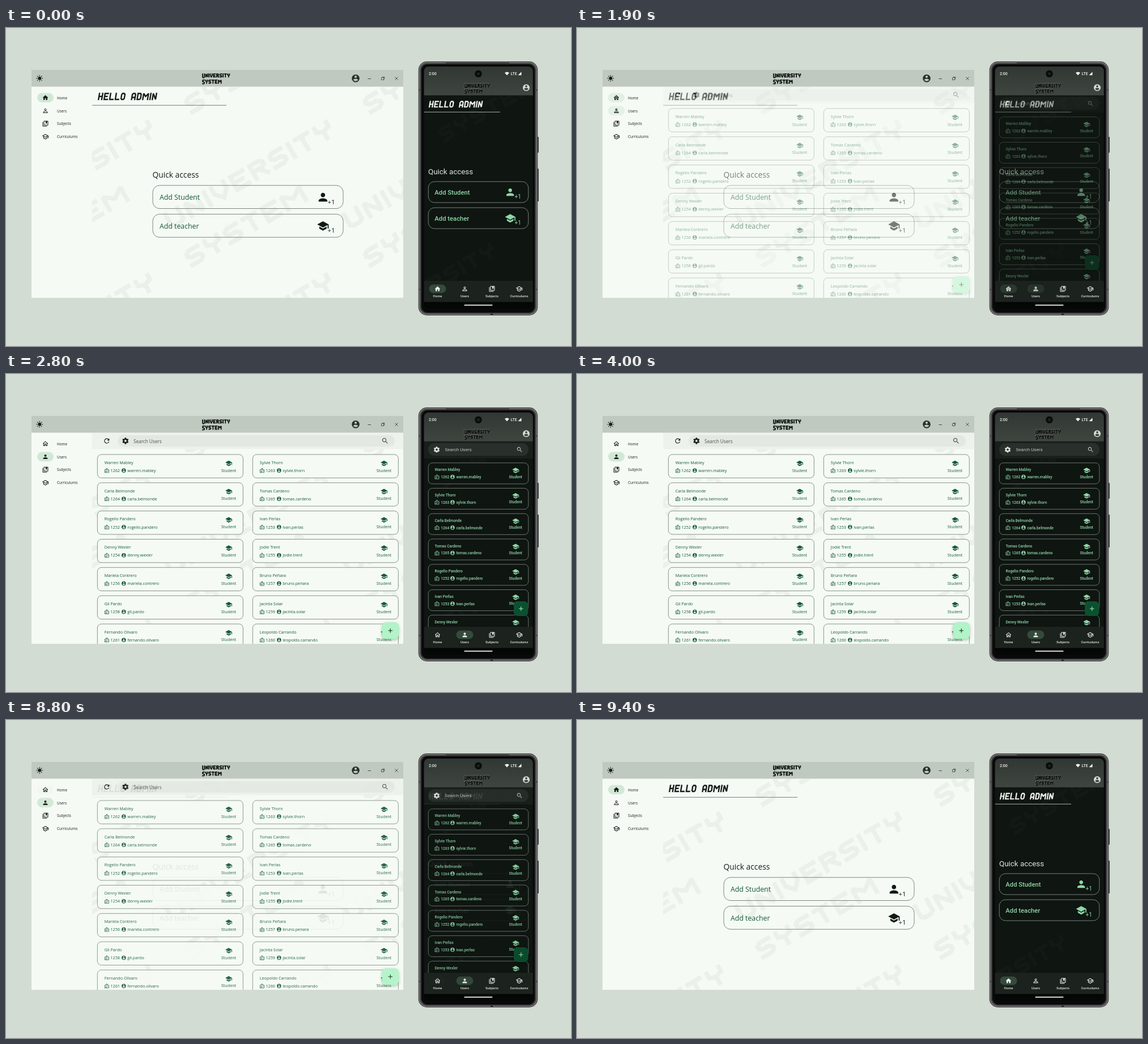
These frames come from a looping animation (997 px wide and 561 px high, 9.5 s). An HTML page with a canvas:

```html
<!DOCTYPE html>
<html lang="en">
<head>
<meta charset="utf-8">
<title>University System</title>
<style>
html, body { margin: 0; width: 100%; height: 100%; overflow: hidden; background: #d2dcd2; }
canvas { display: block; width: 100vw; height: 100vh; }
</style>
</head>
<body>
<canvas id="stage" width="997" height="561"></canvas>
<script>
const W = 997, H = 561, LOOP = 9500;
const SANS = '"Open Sans", "Noto Sans", sans-serif';
const ROBOTO = 'Roboto, Arial, sans-serif';

const PEOPLE = [
  ['Warren Mabley', 1262], ['Sylvie Thorn', 1263],
  ['Carla Belmonde', 1264], ['Tomas Cardeno', 1265],
  ['Rogelio Pandero', 1252], ['Ivan Perlas', 1253],
  ['Denny Wexler', 1254], ['Jodie Trent', 1255],
  ['Mariela Contrero', 1256], ['Bruno Peñara', 1257],
  ['Gil Pardo', 1258], ['Jacinta Solar', 1259],
  ['Fernando Olivaro', 1261], ['Leopoldo Carrando', 1260]
].map(([name, id]) => ({
  name, id,
  login: name.toLowerCase().normalize('NFD').replace(/[\u0300-\u036f]/g, '').replace(' ', '.')
}));

const NAV = ['Home', 'Users', 'Subjects', 'Curriculums'];

// Icons on a 24 unit grid, filled even-odd
const ICONS = {
  home: 'M10 20v-6h4v6h5v-8h3L12 3 2 12h3v8z',
  homeLine: 'M12 5.7l5 4.5V18h-2v-6H9v6H7v-7.8zM12 3L2 12h3v8h6v-6h2v6h6v-8h3z',
  person: 'M12 12c2.2 0 4-1.8 4-4s-1.8-4-4-4-4 1.8-4 4 1.8 4 4 4zm0 2c-2.7 0-8 1.3-8 4v2h16v-2c0-2.7-5.3-4-8-4z',
  personLine: 'M12 5.9a2.1 2.1 0 1 1 0 4.2a2.1 2.1 0 1 1 0-4.2m0 9c3 0 6.1 1.5 6.1 2.1v1.1H5.9V17c0-.6 3.1-2.1 6.1-2.1M12 4a4 4 0 1 0 0 8a4 4 0 1 0 0-8zm0 9c-2.7 0-8 1.3-8 4v3h16v-3c0-2.7-5.3-4-8-4z',
  books: 'M4 6H2v14c0 1.1.9 2 2 2h14v-2H4zM20 2H8c-1.1 0-2 .9-2 2v12c0 1.1.9 2 2 2h12c1.1 0 2-.9 2-2V4c0-1.1-.9-2-2-2zM8 4h12v12H8zM13 4v8l2.5-1.5L18 12V4z',
  cap: 'M5 13.2v4L12 21l7-3.8v-4L12 17zM12 3L1 9l11 6 9-4.9V17h2V9z',
  capLine: 'M12 3L1 9l4 2.2v6L12 21l7-3.8v-6l2-1.1V17h2V9zM18.8 9L12 12.7 5.2 9 12 5.3zM17 16l-5 2.7L7 16v-3.7l5 2.7 5-2.7z',
  account: 'M12 2a10 10 0 1 0 0 20a10 10 0 1 0 0-20zm0 3a3 3 0 1 1 0 6a3 3 0 1 1 0-6zm0 14.2c-2.5 0-4.7-1.3-6-3.2 0-2 4-3.1 6-3.1s6 1.1 6 3.1c-1.3 1.9-3.5 3.2-6 3.2z',
  search: 'M15.5 14h-.8l-.3-.3A6.5 6.5 0 1 0 13.7 14.4l.3.3v.8l5 5 1.5-1.5zM9.5 14a4.5 4.5 0 1 1 0-9a4.5 4.5 0 1 1 0 9z',
  refresh: 'M17.6 6.4A8 8 0 1 0 19.7 14h-2.1A6 6 0 1 1 16.2 7.8L13 11h7V4z',
  badge: 'M20 7h-5V4c0-1.1-.9-2-2-2h-2c-1.1 0-2 .9-2 2v3H4c-1.1 0-2 .9-2 2v11c0 1.1.9 2 2 2h16c1.1 0 2-.9 2-2V9c0-1.1-.9-2-2-2zM4 9h16v11H4zM11 4h2v5h-2zM6 18h6v-1.5L9 15l-3 1.5zM7.5 11h3v3h-3zM14 12h4v1.5h-4zM14 15h4v1.5h-4z',
  plus: 'M19 13h-6v6h-2v-6H5v-2h6V5h2v6h6z'
};
for (const k in ICONS) ICONS[k] = new Path2D(ICONS[k]);

// Display lettering: xy digit pairs, one polyline per word
const GLYPHS = {
  U: '000516364540', N: '06004640', I: '0006', V: '0003264340',
  E: '40000646 0333', R: '06003041423303 2346', S: '40100102133344453606',
  T: '0040 2026', Y: '0002234240 2326', M: '0600336066',
  H: '0006 4046 0343', L: '000646', O: '103041453616050110',
  A: '060110304146 0444', D: '00304145360600'
};

let c;

function box(x, y, w, h, r, fill, stroke, lw = 1) {
  c.beginPath();
  c.roundRect(x, y, w, h, r);
  if (fill) { c.fillStyle = fill; c.fill(); }
  if (stroke) { c.strokeStyle = stroke; c.lineWidth = lw; c.stroke(); }
}

function disc(x, y, r, fill) {
  c.beginPath();
  c.arc(x, y, r, 0, 7);
  c.fillStyle = fill;
  c.fill();
}

function line(x1, y1, x2, y2, color, lw = 1) {
  c.beginPath();
  c.moveTo(x1, y1);
  c.lineTo(x2, y2);
  c.strokeStyle = color;
  c.lineWidth = lw;
  c.stroke();
}

function text(s, x, y, size, color, font = SANS, weight = 400, align = 'left') {
  c.font = `${weight} ${size}px ${font}`;
  c.textAlign = align;
  c.fillStyle = color;
  c.fillText(s, x, y);
}

function icon(name, x, y, size, color) {
  c.save();
  c.translate(x - size / 2, y - size / 2);
  c.scale(size / 24, size / 24);
  c.fillStyle = color;
  c.fill(ICONS[name], 'evenodd');
  c.restore();
}

function rays(x, y, n, r1, r2, color, lw) {
  for (let i = 0; i < n; i++) {
    const a = i * 2 * Math.PI / n, s = Math.sin(a), k = Math.cos(a);
    line(x + s * r1, y + k * r1, x + s * r2, y + k * r2, color, lw);
  }
}

function gear(x, y, r, color) {
  rays(x, y, 6, r * .6, r, color, r * .5);
  c.beginPath();
  c.arc(x, y, r * .56, 0, 7);
  c.strokeStyle = color;
  c.lineWidth = r * .42;
  c.stroke();
}

// x, y is the top left corner of the ink; ux, uy size one glyph unit
function letters(s, x, y, ux, uy, lw, gap, color, { slant = 0, angle = 0, bigFirst = 1 } = {}) {
  c.save();
  c.translate(x, y);
  c.rotate(angle);
  c.transform(1, 0, -slant, 1, 0, 0);
  c.beginPath();
  let pen = lw / 2;
  [...s].forEach((ch, i) => {
    if (ch === ' ') { pen += gap + 5 * ux; return; }
    const ky = uy * (i ? 1 : bigFirst);
    let right = 0;
    for (const part of GLYPHS[ch].split(' ')) {
      for (let j = 0; j < part.length; j += 2) {
        const gx = +part[j], gy = +part[j + 1];
        right = Math.max(right, gx);
        c[j ? 'lineTo' : 'moveTo'](pen + gx * ux, lw / 2 + gy * ky);
      }
    }
    pen += right * ux + lw + gap;
  });
  c.strokeStyle = color;
  c.lineWidth = lw;
  c.lineCap = 'square';
  c.lineJoin = 'miter';
  c.miterLimit = 2;
  c.stroke();
  c.restore();
  c.lineCap = 'butt';
}

function clip(x, y, w, h, draw, r = 0) {
  c.save();
  c.beginPath();
  c.roundRect(x, y, w, h, r);
  c.clip();
  draw();
  c.restore();
}

function wordmark(x, y, k, color) {
  const o = { bigFirst: 1.22 };
  letters('UNIVERSITY', x, y, .78 * k, .9 * k, 1.75 * k, .75 * k, color, o);
  letters('SYSTEM', x, y + 10.8 * k, .78 * k, .9 * k, 1.75 * k, .75 * k, color, o);
}

function hello(x, y, k, color) {
  letters('HELLO ADMIN', x + 2 * k, y, 1.42 * k, 1.75 * k, 2.4 * k, 1.8 * k, color, { slant: .17 });
}

function mark(word, x, y, k, color) {
  letters(word, x, y, 6 * k, 4.2 * k, 8 * k, 7 * k, color, { angle: -Math.PI / 6 });
}

function listCard(p, x, y, w, h, t) {
  const { font, ink, green, size } = t;
  box(x, y, w, h, 7, t.bg, t.edge, .9);
  text(p.name, x + t.pad, y + t.row1, size, green, font, 500);
  icon('badge', x + t.pad + 4, y + t.row2 - 2.7, 9.5, ink);
  text(p.id, x + t.pad + 10.7, y + t.row2, size, green, font, 500);
  icon('account', x + t.user, y + t.row2 - 2.7, 9, ink);
  text(p.login, x + t.user + 6.5, y + t.row2, size, green, font, 500);
  icon('cap', x + w - t.cap, y + t.row1 - 1.2, 13, green);
  text('Student', x + w - t.cap, y + t.row2 - .5, size, green, font, 500, 'center');
}

function fab(x, y, w, h, fill, ink) {
  c.save();
  c.shadowColor = 'rgba(0,0,0,.25)';
  c.shadowBlur = 5;
  c.shadowOffsetY = 2;
  box(x, y, w, h, 7, fill);
  c.restore();
  icon('plus', x + w / 2, y + h / 2, 13, ink);
}

function navIcon(i, active, x, y, color) {
  const name = [active ? 'home' : 'homeLine', active ? 'person' : 'personLine', 'books', 'capLine'][i];
  icon(name, x, y, i === 3 ? 12.5 : 12, color);
}

function desktop(users) {
  const bg = '#f5faf4', ink = '#181d19', green = '#145a36', edge = '#7d8780';
  box(45, 74, 656, 402, 0, bg);

  clip(152, 104, 549, 372, () => {
    for (let i = -1; i < 3; i++) for (let j = -1; j < 3; j++) {
      mark('UNIVERSITY', 276 + i * 315, 328 + j * 270, 1, '#ebf1ea');
      mark('SYSTEM', 311 + i * 315, 395 + j * 270, 1, '#ebf1ea');
    }
    if (users) desktopUsers(bg, ink, green, edge);
    else desktopHome(ink, green, edge);
  });

  NAV.forEach((label, i) => {
    const y = 123 + i * 22.9, on = i === +users;
    if (on) box(55, y - 8.3, 29, 16.6, 8.3, '#d1e8d6');
    navIcon(i, on, 69.5, y, ink);
    text(label, 90, y + 2.6, 6.4, ink, SANS, 500);
  });

  box(45, 74, 656, 29.5, 0, '#bfc9c0');
  disc(59.3, 88.8, 3, ink);
  rays(59.3, 88.8, 8, 4, 5.8, ink, 1.2);
  wordmark(346, 80.2, 1, '#0c0f0d');
  icon('account', 617, 88.8, 16.5, '#2b302c');
  line(638.5, 89.5, 644, 89.5, '#444b46');
  box(662.5, 87.5, 4, 4, 0, null, '#444b46', .9);
  line(664, 86.3, 668, 86.3, '#444b46', .8);
  line(667.7, 86, 667.7, 90.5, '#444b46', .8);
  line(686.3, 86.3, 691.7, 91.7, '#444b46', .9);
  line(691.7, 86.3, 686.3, 91.7, '#444b46', .9);
}

function desktopHome(ink, green, edge) {
  hello(162, 114.3, 1, ink);
  line(152, 136.4, 389, 136.4, '#8c958e', 1.4);
  text('Quick access', 258.5, 263.8, 13.8, ink);
  [['Add Student', 'person', 23], ['Add teacher', 'cap', 22]].forEach(([label, name, size], i) => {
    const y = 277.7 + i * 50.7;
    box(259, y, 336, 40.8, 12, null, edge);
    text(label, 271, y + 25.6, 12.3, green, SANS, 500);
    icon(name, 559.3, y + 20.8, size, '#0e1c14');
    text('+1', 567.5, y + 33, 11.5, '#0e1c14', SANS, 500);
  });
}

function desktopUsers(bg, ink, green, edge) {
  box(152, 104, 549, 28.5, 0, '#edf3ec');
  box(197, 108, 489, 20.3, 10, '#e3e9e2');
  icon('refresh', 177.8, 118, 13.5, ink);
  gear(210.8, 118, 5.6, ink);
  text('Search Users', 225, 121.5, 8.2, '#4a514c');
  icon('search', 669, 118, 13.5, '#3c433e');
  const theme = {
    font: SANS, size: 7.2, green, ink: green, bg, edge,
    pad: 12.5, row1: 16.8, row2: 31, user: 46.5, cap: 25.3
  };
  PEOPLE.forEach((p, i) =>
    listCard(p, i % 2 ? 435.3 : 161.3, 142 + (i >> 1) * 49.83, 257, 41.3, theme));
  fab(663.5, 438, 29.5, 29.5, '#b0f4c7', '#12251a');
}

function phone(users) {
  const bg = '#0f1511', ink = '#e0e5df', green = '#8fd7a8', edge = '#78817a';
  // Body and side keys
  box(936.5, 192, 3.5, 28, 1, '#3d3c3e');
  box(936.5, 248, 3.5, 58, 1, '#3d3c3e');
  box(727.7, 59, 210.6, 448, 15, '#39383a');
  box(729.7, 61, 206.6, 444, 13, null, '#706e71', 2.2);
  box(733, 64, 200, 438, 11, '#080909');
  line(776, 61.5, 888, 61.5, '#2c2b2d', 1.2);
  box(855, 504, 4, 2, 0, '#2a2a2b');
  for (const y of [108, 460]) {
    box(728, y, 4, 2.5, 0, '#444346');
    box(934, y, 4, 2.5, 0, '#444346');
  }

  clip(737.7, 68, 192, 426.5, () => {
    box(737, 68, 194, 416, 0, bg);
    clip(737, 119, 194, 327, () => {
      mark('SYSTEM', 760, 180, .8, '#131915');
      mark('UNIVERSITY', 622, 512, .8, '#131915');
      if (users) phoneUsers(bg, ink, green, edge);
      else phoneHome(ink, green, edge);
    });

    const head = c.createLinearGradient(0, 68, 0, 119);
    head.addColorStop(0, '#313732');
    head.addColorStop(1, '#3f4640');
    box(737, 68, 194, 50.7, 0, head);
    text('2:00', 746, 83, 7, '#f2f4f1', ROBOTO, 500);
    disc(833.5, 80.8, 6.3, '#0a0c0b');
    disc(833.5, 80.8, 2.4, '#1d2722');
    c.beginPath();
    c.moveTo(884, 83.4);
    c.lineTo(880, 79);
    c.quadraticCurveTo(884, 75.8, 888, 79);
    c.moveTo(903.5, 83.3);
    c.lineTo(909.5, 83.3);
    c.lineTo(909.5, 77.3);
    c.fillStyle = '#f2f4f1';
    c.fill();
    text('LTE', 890.5, 83, 6.9, '#f2f4f1', ROBOTO, 500);
    wordmark(808.6, 97.6, .9, '#7d857f');
    wordmark(809.2, 98.2, .9, '#080a09');
    icon('account', 918, 105.3, 14.5, '#d5dad5');

    box(737, 446, 194, 37.5, 0, '#1c221e');
    NAV.forEach((label, i) => {
      const x = 761.5 + i * 48, on = i === +users;
      if (on) box(x - 15, 452.5, 30, 15, 7.5, '#344b3c');
      navIcon(i, on, x, 460.2, '#eef2ed');
      text(label, x, 474.8, 5.9, ink, ROBOTO, 500, 'center');
    });
    box(737, 483.5, 194, 12, 0, '#050606');
    box(808.5, 488, 50, 1.8, .9, '#eceeec');
  }, 8);
}

function phoneHome(ink, green, edge) {
  hello(746, 128.6, .91, '#f0f3ef');
  line(737, 148.4, 872, 148.4, '#89928b', 1.3);
  text('Quick access', 745, 258.4, 13.4, ink, ROBOTO);
  [['Add Student', 'person'], ['Add teacher', 'cap']].forEach(([label, name], i) => {
    const y = 271 + i * 46;
    box(745.2, y, 176.6, 37, 11, null, edge);
    text(label, 756.3, y + 22.6, 11.25, green, ROBOTO, 500);
    icon(name, 889.7, y + 18.7, 20, green);
    text('+1', 897.5, y + 30.3, 10, green, ROBOTO, 400);
  });
}

function phoneUsers(bg, ink, green, edge) {
  box(737, 118, 194, 31, 0, '#191f1b');
  box(745, 122, 177, 22.5, 11.2, '#292f2a');
  gear(760, 133.4, 5.2, ink);
  text('Search Users', 774.6, 136.3, 8, '#c2c9c2', ROBOTO);
  icon('search', 906.3, 133.4, 12, '#c9d0c9');
  const theme = {
    font: ROBOTO, size: 6.7, green, ink: green, bg, edge,
    pad: 11.3, row1: 14.6, row2: 27.4, user: 42.7, cap: 22.6
  };
  PEOPLE.slice(0, 7).forEach((p, i) =>
    listCard(p, 745.2, 156.8 + i * 44.75, 176.6, 37, theme));
  fab(896, 401, 25.5, 26, '#0b5130', '#a9efc0');
}

function scene(users) {
  const layer = document.createElement('canvas');
  layer.width = W;
  layer.height = H;
  c = layer.getContext('2d');
  box(0, 0, W, H, 0, '#d2dcd2');
  desktop(users);
  phone(users);
  return layer;
}

const home = scene(false), list = scene(true);
const view = document.getElementById('stage').getContext('2d');

function ease(t, start) {
  const x = Math.min(1, Math.max(0, (t - start) / 670));
  return x * x * (3 - 2 * x);
}

function frame(now) {
  const t = Math.floor(now % LOOP / 100) * 100;
  view.globalAlpha = 1;
  view.drawImage(home, 0, 0);
  view.globalAlpha = ease(t, 1590) - ease(t, 8680);
  view.drawImage(list, 0, 0);
  requestAnimationFrame(frame);
}
requestAnimationFrame(frame);
</script>
</body>
</html>
```
